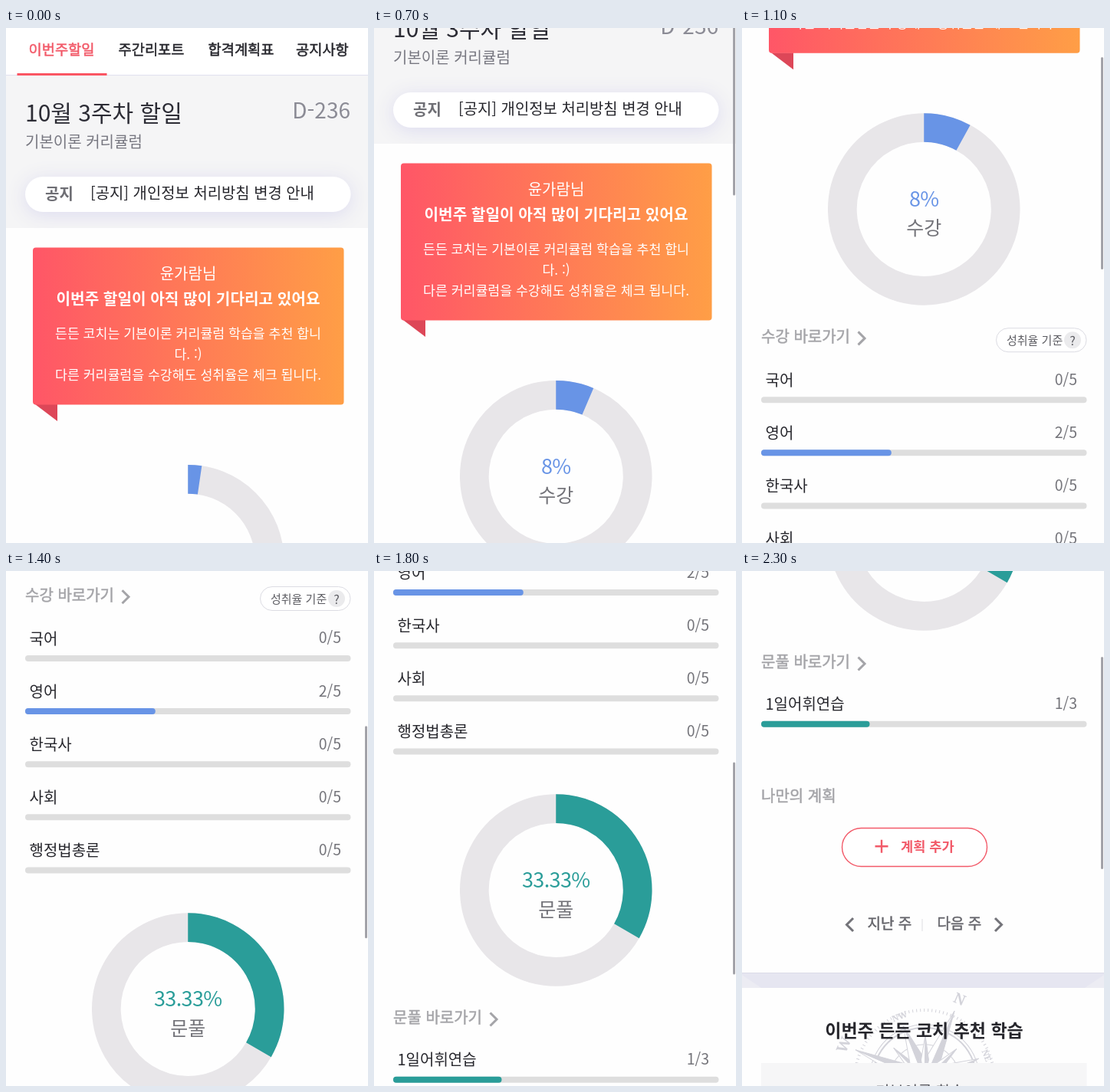
Animation of 472 by 672 pixels, one loop 2.5 s. Source, as an HTML page:

```html
<!DOCTYPE html>
<html lang="ko">
<head>
<meta charset="utf-8">
<style>
  html, body { margin: 0; width: 100%; height: 100%; overflow: hidden; background: #fefefe; }
  svg { display: block; width: 472px; height: 672px; }
  text { font-family: "Noto Sans CJK KR", "Noto Sans CJK", "Noto Sans CJK JP", sans-serif; white-space: pre; }
  .pill { filter: drop-shadow(0 4px 12px #dcdbef); }
</style>
</head>
<body>
<svg viewBox="0 0 472 672">
  <defs>
    <linearGradient id="warm"><stop stop-color="#ff5667"/><stop offset="1" stop-color="#ff9e46"/></linearGradient>
  </defs>
  <g id="page"></g>
  <rect id="thumb" x="468" width="3" height="277" rx="1.5" fill="#a2a2a8"/>
</svg>
<script>
const RED = '#f25a69', BLUE = '#6894e6', TEAL = '#2a9d99', INK = '#26262c', MID = '#737379', PALE = '#a4a4a8', TRACK = '#e8e6e9';
const page = document.getElementById('page'), thumb = document.getElementById('thumb');
const out = [];

const rect = (x, y, w, h, fill, rx = 0, more = '') =>
  out.push(`<rect x="${x}" y="${y}" width="${w}" height="${h}" rx="${rx}" fill="${fill}" ${more}/>`);
const path = (d, stroke, width, fill = 'none', more = '') =>
  out.push(`<path d="${d}" stroke="${stroke}" stroke-width="${width}" fill="${fill}" ${more}/>`);
// y is the middle of the glyphs
const text = (x, y, str, size, fill, weight = 400, anchor = 'start', more = '') =>
  out.push(`<text x="${x}" y="${y + size * .38}" font-size="${size}" fill="${fill}" font-weight="${weight}" text-anchor="${anchor}" ${more}>${str}</text>`);
// medium weight: regular glyphs with a thin outline
const medium = (x, y, str, size, fill) =>
  text(x, y, str, size, fill, 400, 'start', `stroke="${fill}" stroke-width=".5"`);
const chevron = (x, y, dir, color) =>
  path(`M${x - 4 * dir} ${y - 8.5}l${8.5 * dir} 8.5l${-8.5 * dir} 8.5`, color, 3);

const CX = 237.25, R = 106.4, LECTURES = 695.2;
function arc(cy, deg) {
  const a = deg * Math.PI / 180;
  return `M${CX} ${cy - R}A${R} ${R} 0 ${+(deg > 180)} 1 ${CX + R * Math.sin(a)} ${cy - R * Math.cos(a)}`;
}
function donut(cy, deg, color, value, label, id) {
  path(arc(cy, 359.99), TRACK, 37.7, 'none', `id="${id}Track"`);
  path(arc(cy, deg), color, 37.7, 'none', `id="${id}"`);
  text(CX, cy - 13.5, value, 27, color, 400, 'middle', 'letter-spacing="-.6"');
  text(CX, cy + 24.5, label, 25, MID, 400, 'middle');
  medium(25, cy + 165.7, label + ' 바로가기', 20, PALE);
  chevron(155.5, cy + 168.5, 1, PALE);
}
function row(y, name, done, total, color) {
  text(30.5, y - 26, name, 20, INK);
  text(437, y - 27, `${done}/${total}`, 19.5, MID, 400, 'end');
  rect(25, y - 4, 424.5, 8, '#dedede', 4);
  if (done) rect(25, y - 4, 424.5 * done / total, 8, color, 4);
}

// tabs
rect(0, 0, 472, 61, '#fff');
rect(0, 62, 472, 199, '#f5f5f6');
rect(0, 61, 472, 1, '#e1e1ef');
rect(14.5, 59, 117, 3, '#fa5563');
['이번주할일', '주간리포트', '합격계획표'].forEach((s, i) =>
  medium(29.5 + 117 * i, 28, s, 18.7, i ? INK : RED));
medium(378, 28, '공지사항', 18.7, INK);

// heading and notice
text(25, 110.5, '10월 3주차 할일', 30, '#2c2c35');
text(25, 148, '기본이론 커리큘럼', 20, '#777780');
text(449, 107, 'D-236', 28, '#8b8b95', 400, 'end');
rect(25, 194, 424.5, 46, '#fff', 23, 'class="pill"');
text(51, 216, '공지', 20, '#6e6e74', 700);
text(110, 215.5, '[공지] 개인정보 처리방침 변경 안내', 19.9, INK);
rect(0, 261, 472, 1712, '#fefefe');

// speech bubble
path('M38 491H67V513Z', 'none', 0, '#dd4758');
rect(35, 286.5, 405.5, 205, 'url(#warm)', 4);
text(237.5, 320, '윤가람님', 20, '#fff', 400, 'middle');
text(237.5, 353.5, '이번주 할일이 아직 많이 기다리고 있어요', 20.2, '#fff', 700, 'middle');
['든든 코치는 기본이론 커리큘럼 학습을 추천 합니', '다. :)', '다른 커리큘럼을 수강해도 성취율은 체크 됩니다.'].forEach((s, i) =>
  text(237.5, 398.5 + 26.8 * i, s, 17.3, '#fff', 400, 'middle'));

// lectures
donut(LECTURES, 28.8, BLUE, '8%', '수강', 'ring');
rect(331.5, 850.5, 117.5, 31, '#fff', 15.5, 'stroke="#dcdce3"');
text(345, 866, '성취율 기준', 15, '#5d5d63');
out.push('<circle cx="431" cy="866" r="11" fill="#ebebed"/>');
text(431, 866.5, '?', 16, '#5d5d63', 400, 'middle');
['국어', '영어', '한국사', '사회', '행정법총론'].forEach((s, i) =>
  row(944 + 69.1 * i, s, i == 1 ? 2 : 0, 5, BLUE));

// exercises
donut(1401.5, 120, TEAL, '33.33%', '문풀', 'ring2');
row(1648.7, '1일어휘연습', 1, 3, TEAL);

// own plan
medium(25, 1742, '나만의 계획', 20, PALE);
rect(130.5, 1784.5, 189, 50, '#fff', 25, `stroke="${RED}" stroke-width="1.4"`);
path('M173.5 1808.3h17m-8.5-8.5v17', RED, 2.4);
text(207, 1808, '계획 추가', 17.6, RED, 700);
chevron(141, 1910.5, -1, MID);
medium(163.5, 1909, '지난 주', 19, '#66666c');
rect(234.5, 1903, 1, 16, '#dedee2');
medium(254.5, 1909, '다음 주', 19, '#66666c');
chevron(334, 1910.5, 1, MID);

// recommendation with compass
rect(0, 1973, 472, 20, '#e6e6f1');
rect(0, 1973, 472, 1, '#dcdce8');
path('M0 1976L25 1993H0ZM472 1976L447 1993H472Z', 'none', 0, '#ececf3');
rect(0, 1993, 472, 400, '#fefefe');
const GREY = '#d3d3da';
out.push(`<g transform="translate(238 2113) rotate(23.5)" fill="none" stroke="${GREY}">
  <circle r="91" stroke-width="4" stroke-dasharray="1 4"/><circle r="72"/><circle r="68" stroke-width="2"/><circle r="46"/>`);
for (let i = 0; i < 16; i++) {
  const len = i % 4 == 0 ? 98 : i % 2 ? 58 : 76, w = i % 2 ? 5 : 10;
  out.push(`<g transform="rotate(${i * 22.5})">`);
  path(`M0 ${-len}L${w} -26L0 0Z`, GREY, 1, GREY);
  path(`M0 ${-len}L${-w} -26L0 0Z`, GREY, 1, '#fff');
  out.push('</g>');
}
[['N', 0, 115, 19], ['W', -90, 115, 19], ['NW', -45, 89, 11], ['NE', 45, 87, 11]].forEach(([s, a, r, size]) =>
  out.push(`<text transform="rotate(${a})" y="${-r + size * .36}" font-size="${size}" font-weight="700" text-anchor="middle" fill="${GREY}" stroke="none" style="font-family:'Noto Serif',serif">${s}</text>`));
out.push('</g>');
text(237.5, 2048, '이번주 든든 코치 추천 학습', 23, INK, 700, 'middle');
rect(25, 2091, 424.5, 200, '#f6f6f7');
text(232, 2128, '기본이론 학습', 20, '#55555c', 400, 'middle');

page.innerHTML = out.join('');
const ring = document.getElementById('ring'), ringTrack = document.getElementById('ringTrack');

// start time, scroll offset, angles of the first ring and its track
const steps = [
  [0, 0, 8.3, 180], [500, 0, 16, 180], [700, 110, 23], [900, 223.7], [1000, 343], [1100, 458.8], [1200, 590],
  [1300, 720], [1400, 830], [1500, 905], [1600, 945], [1800, 985], [1900, 1080], [2000, 1181],
  [2100, 1286], [2200, 1378], [2300, 1449]
];
// scroll offset, top of the scrollbar thumb
const track = [[0, -89], [224, -27], [459, 38], [945, 253], [1181, 232], [1449, 112]];
function thumbTop(s) {
  const i = Math.max(1, track.findIndex(p => p[0] >= s));
  const [[a, u], [b, v]] = [track[i - 1], track[i]];
  return u + (v - u) * (s - a) / (b - a);
}

function draw() {
  const t = performance.now() % 2500;
  const [, scroll, deg = 28.8, trackDeg = 359.99] = steps.filter(s => s[0] <= t).pop();
  page.setAttribute('transform', `translate(0 ${-scroll})`);
  ring.setAttribute('d', arc(LECTURES, deg));
  ringTrack.setAttribute('d', arc(LECTURES, trackDeg));
  thumb.setAttribute('y', thumbTop(scroll));
  thumb.setAttribute('visibility', scroll ? 'visible' : 'hidden');
  requestAnimationFrame(draw);
}
draw();
</script>
</body>
</html>
```
